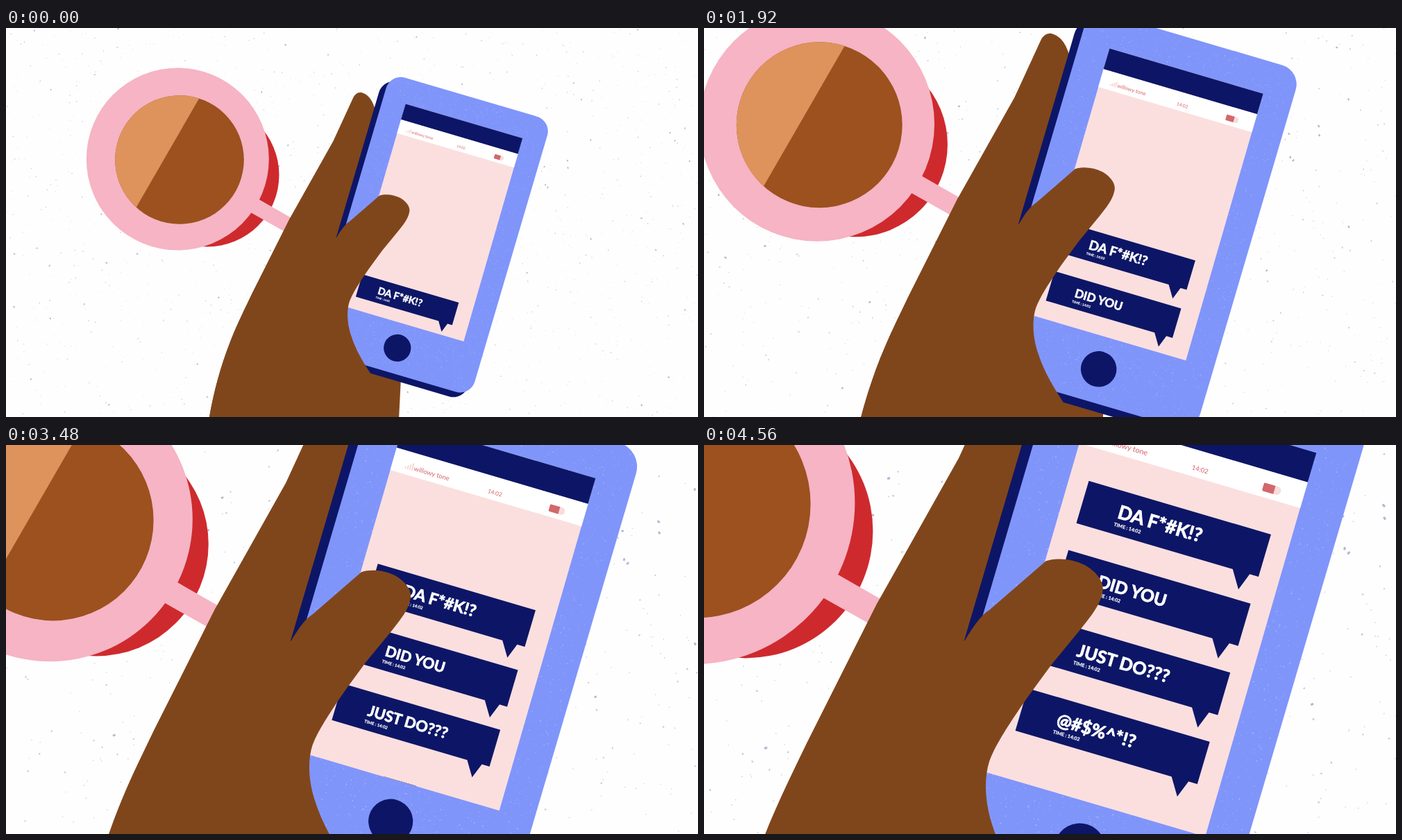
An HTML page that plays this animation: 997x561 px, repeating every 4600 ms.

```html
<!DOCTYPE html>
<html lang="en">
<head>
<meta charset="utf-8">
<title>Coffee and messages</title>
<style>
  html, body { margin: 0; width: 100%; height: 100%; overflow: hidden; background: #fefefe; }
  svg { display: block; width: 100%; height: 100%; }
  text { font-family: Lato, "Open Sans", sans-serif; }
  .speck { fill: none; stroke-linecap: round; }
  .bubble { fill: #0d1666; }
  .bubble text { fill: #fff; font-weight: 700; stroke: #fff; }
  .words { stroke-width: 0.5; }
  .time { stroke-width: 0.12; }
  .status { fill: #d6616a; }
</style>
</head>
<body>
<svg viewBox="0 0 997 561" preserveAspectRatio="xMidYMid slice">
  <defs>
    <clipPath id="screen"><path d="M-175.4 0H0L1.6 305H-174.4Z"/></clipPath>
    <clipPath id="coffee"><circle cx="250" cy="190" r="92.8"/></clipPath>
  </defs>

  <g id="table">
    <g id="grit"></g>
    <circle cx="290" cy="212" r="103.5" fill="#ce2a2e"/>
    <g fill="#f6b4c4">
      <path d="M340 233.2L430 284.7L418 303L330 253.3Z"/>
      <circle cx="247.3" cy="189" r="131.5"/>
    </g>
    <g clip-path="url(#coffee)">
      <rect x="150" y="90" width="200" height="200" fill="#9c511f"/>
      <path d="M290 81.2L176 278.8H140V81Z" fill="#de935c"/>
    </g>
  </g>

  <g id="front">
    <path fill="#80461b" d="M290 575L293 561C300 520 311 483 324 450C334 425 344 405 355.5 381L409.5 273.5L471.5 163
      L500 101Q504 92 512 93Q524 96 530 112L560 200V480L569 505L565.5 575Z"/>
    <g transform="translate(744 159) rotate(16.4)">
      <rect x="-217" y="-27" width="243" height="414" rx="22" fill="#0d1666"/>
      <rect x="-208.8" y="-36" width="242.1" height="414" rx="22" fill="#8095fa"/>
      <g id="grain"></g>
      <path d="M-175.4 0H0L1.6 305H-174.4Z" fill="#fbdfdf"/>
      <rect x="-175.4" width="175.6" height="23.6" fill="#0d1666"/>
      <rect x="-175.4" y="23.5" width="175.7" height="20.5" fill="#fff"/>
      <path d="M-163 39v-2M-161 39v-3.5M-159 39v-5M-157 39v-6.5" stroke="#f7d3d3" stroke-width="1.1"/>
      <g class="status">
        <text x="-155.6" y="38.6" font-size="5.8">willowy tone</text>
        <text x="-87.6" y="39" font-size="5">14:02</text>
      </g>
      <rect x="-31.5" y="33" width="14" height="6.5" rx="2.8" fill="#f9dcdc"/>
      <path d="M-22.5 33V39.5H-30.5Q-31.5 39.5 -31.5 38.5V34Q-31.5 33 -30.5 33Z" fill="#d2686b"/>
      <g id="chat" clip-path="url(#screen)"></g>
      <circle cx="-87.5" cy="341" r="19.6" fill="#0d1666"/>
    </g>
    <path fill="#80461b" d="M476 302.5C483 291 488 283.5 495 279L538 241.7C547 239 558 240 568 245C578 251 583 259 581 266
      C579 276 572 284 565 293L542 321L523 347C510 366 500 381 495 394C490 409 492 428 497 443
      C503 462 512 478 525 498V575H290L293 561C300 520 311 483 324 450C334 425 344 405 355.5 381L409.5 273.5Z"/>
  </g>
</svg>

<script>
const LOOP = 4600, STEP = 40;
const MOVES = [30, 1900, 3370];
const PITCH = 55, BUBBLE = { w: 144.8, h: 33.7 };
const MESSAGES = [
  ['DA F*#K!?', 14.3], ['DID YOU', 13], ['JUST DO???', 13.3], ['@#$%^*!?', 13.6]
];

// Resting poses as [x, y, scale]; the nearer plane grows faster.
const FRONT = [[744, 159, 1], [805, 95, 1.311], [841.4, 56.5, 1.577], [882, 11, 1.89]];
const TABLE = [[250, 190, 1], [167, 140, 1.285], [86, 114, 1.512], [-11, 85, 1.772]];
const COLUMN = [[-21, 253.3], [-19.5, 197.2], [-18.2, 141.4], [-15.4, 69.5]];

const $ = id => document.getElementById(id);
const front = $('front'), table = $('table'), chat = $('chat');

let seed = 11;
const random = () => (seed = (seed * 16807) % 2147483647) / 2147483647;

function specks(parent, count, [x, y, w, h], size, color, opacity) {
  let d = '';
  for (let i = 0; i < count; i++) {
    const px = x + random() * w, py = y + random() * h;
    const dx = (random() - 0.5) * size, dy = (random() - 0.5) * size;
    d += `M${px.toFixed(1)} ${py.toFixed(1)}l${dx.toFixed(2)} ${dy.toFixed(2)}`;
  }
  $(parent).insertAdjacentHTML('beforeend',
    `<path class="speck" d="${d}" stroke="${color}" stroke-width="${size}" stroke-opacity="${opacity}"/>`);
}

const floor = [-20, -20, 1040, 600], body = [-205, -32, 234, 406];
specks('grit', 1000, floor, 0.8, '#b9bac9', 0.65);
specks('grit', 340, floor, 1.3, '#b0b1cb', 0.65);
specks('grit', 80, floor, 1.9, '#9b9dc3', 0.7);
specks('grain', 2400, body, 0.55, '#a9b7fd', 0.7);
specks('grain', 500, body, 0.8, '#c3cdff', 0.6);

const bubbles = MESSAGES.map(([words, size]) => {
  chat.insertAdjacentHTML('beforeend', `<g class="bubble">
    <path d="M${-BUBBLE.w} 0H0V${BUBBLE.h}H-7L-12 47.2L-20.5 ${BUBBLE.h}H${-BUBBLE.w}Z"/>
    <text class="words" x="-116.5" y="21" font-size="${size}">${words}</text>
    <text class="time" x="-117" y="27.6" font-size="3.7">TIME : 14:02</text></g>`);
  return chat.lastElementChild;
});

// Quick start settling into a long tail.
function settle(t, start, rate) {
  const x = Math.max(0, t - start) * rate;
  return 1 - (1 + x) * Math.exp(-x);
}

const blend = (poses, progress) => poses[0].map((value, axis) =>
  progress.reduce((sum, p, i) => sum + (poses[i + 1][axis] - poses[i][axis]) * p, value));

function place(group, poses, progress) {
  const [x, y, scale] = blend(poses, progress);
  const [ox, oy] = poses[0];
  group.setAttribute('transform', `translate(${x} ${y}) scale(${scale}) translate(${-ox} ${-oy})`);
}

function draw(t) {
  const camera = MOVES.map(start => settle(t, start, 0.0072));
  const pops = MOVES.map(start => settle(t, start, 0.0077));
  place(front, FRONT, camera);
  place(table, TABLE, camera);

  const [x, y] = blend(COLUMN, pops);
  const cx = -BUBBLE.w / 2, cy = BUBBLE.h / 2;
  bubbles.forEach((bubble, i) => {
    const scale = i ? pops[i - 1] : 1;
    bubble.setAttribute('display', scale > 0.01 ? 'inline' : 'none');
    bubble.setAttribute('transform',
      `translate(${x + cx} ${y + i * PITCH + cy}) scale(${scale}) translate(${-cx} ${-cy})`);
  });
}

const begin = performance.now();
function tick() {
  const t = (performance.now() - begin) % LOOP;
  draw(Math.floor(t / STEP) * STEP);
  requestAnimationFrame(tick);
}
tick();
</script>
</body>
</html>
```
